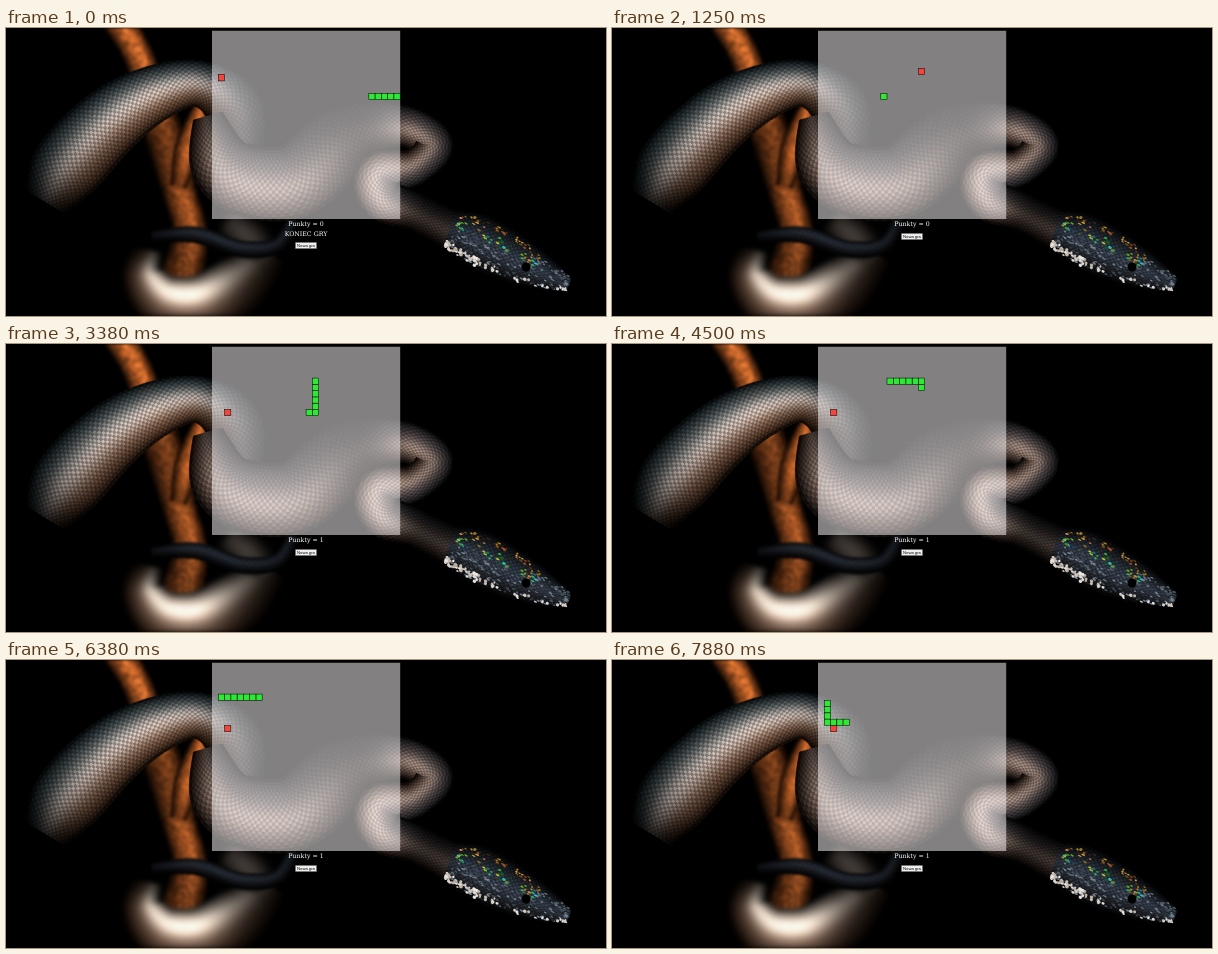
Recreate the animation shown at these times as an HTML page with a canvas. Size 600 by 288 pixels, loop 8000 ms.

```html
<!DOCTYPE html>
<html lang="pl">
<head>
<meta charset="utf-8">
<title>Snake</title>
<style>
  html, body { margin: 0; width: 100%; height: 100%; overflow: hidden; background: #000; }
  #stage { position: absolute; left: 0; top: 0; width: 600px; height: 288px; overflow: hidden; }
  canvas { position: absolute; left: 0; top: 0; }
  .line {
    position: absolute; left: 0; width: 600px; height: 10px; line-height: 10px;
    text-align: center; color: #fff; font-family: "DejaVu Serif", serif; font-size: 6.27px;
  }
  #score { top: 191px; }
  #over { top: 201px; }
  #button {
    position: absolute; left: 289px; width: 22px; height: 7px; line-height: 6px;
    box-sizing: border-box; border: 0.5px solid #767676; border-radius: 1px;
    background: #efefef; color: #000; text-align: center; white-space: nowrap;
    font-family: "Liberation Sans", Arial, sans-serif; font-size: 4.17px;
  }
</style>
</head>
<body>
<div id="stage">
  <canvas id="view" width="600" height="288"></canvas>
  <div class="line" id="score"></div>
  <div class="line" id="over">KONIEC GRY</div>
  <div id="button">Nowa gra</div>
</div>
<script>
const W = 600, H = 288, LOOP = 8000, FRAME = 125, TICK = 200;
const RESTART = 1125, FIRST_TICK = 1140;
const BOARD = { x: 206, y: 2.7, size: 188.2 };
const CELL = BOARD.size / 30;
const $ = id => document.getElementById(id);
const ctx = $('view').getContext('2d');

// ---------- background ----------
function makeLayer() {
  const c = document.createElement('canvas');
  c.width = W;
  c.height = H;
  return c;
}
const photo = makeLayer();
const p = photo.getContext('2d');

let seed = 7;
const rand = () => (seed = (seed * 16807) % 2147483647) / 2147483647;

function spline(pts, u) {
  const i = Math.min(Math.floor(u), pts.length - 2), t = u - i;
  const q = j => pts[Math.max(0, Math.min(pts.length - 1, j))];
  const [a, b, c, d] = [q(i - 1), q(i), q(i + 1), q(i + 2)];
  return b.map((v, k) => v + 0.5 * t * (c[k] - a[k] +
    t * (2 * a[k] - 5 * v + 4 * c[k] - d[k] + t * (3 * (v - c[k]) + d[k] - a[k]))));
}

// Cross-section of a tube at u; at(v) runs from its left side (0) to its right (1).
function slice(pts, u) {
  const end = pts.length - 1, [x, y, r, light] = spline(pts, u);
  const a = spline(pts, Math.max(0, u - 0.02)), b = spline(pts, Math.min(end, u + 0.02));
  const dx = b[0] - a[0], dy = b[1] - a[1], k = r / (Math.hypot(dx, dy) || 1);
  return { x, y, light, at: v => [x + dy * k * (1 - 2 * v), y - dx * k * (1 - 2 * v)] };
}

// pts: [x, y, radius, brightness]; left and right tints blend, shine is added around peak.
function tube(pts, { left, right, shine, peak = 0.5, blur = 0.4, scale = 0.2, lanes = 22, grain }) {
  const rows = [];
  for (let u = 0; u <= pts.length - 1; u += 0.01) {
    const s = slice(pts, u), last = rows[rows.length - 1];
    if (!last || Math.hypot(s.x - last.x, s.y - last.y) >= 2.5) rows.push(s);
  }
  const layer = makeLayer(), g = layer.getContext('2d');
  g.lineWidth = 0.6;
  for (let i = 0; i < rows.length - 1; i++) {
    for (let j = 0; j < lanes; j++) {
      const v = (j + 0.5) / lanes;
      const round = Math.sin(Math.PI * v) ** 0.7;
      const gloss = Math.exp(-(((v - peak) / 0.2) ** 2));
      const bump = grain ? rand() * 2 - 1 : (i + j) % 2 * 2 - 1;
      const k = rows[i].light * (1 + scale * bump);
      const color = left.map((c, n) =>
        Math.min(255, k * (round * (c + (right[n] - c) * v) + gloss * shine[n])) | 0);
      g.fillStyle = g.strokeStyle = `rgb(${color})`;
      g.beginPath();
      g.moveTo(...rows[i].at(j / lanes));
      g.lineTo(...rows[i].at((j + 1) / lanes));
      g.lineTo(...rows[i + 1].at((j + 1) / lanes));
      g.lineTo(...rows[i + 1].at(j / lanes));
      g.closePath();
      g.fill();
      g.stroke();
    }
  }
  p.filter = `blur(${blur}px)`;
  p.drawImage(layer, 0, 0);
  p.filter = 'none';
}

function dot(x, y, rx, ry, angle, color) {
  p.fillStyle = color;
  p.beginPath();
  p.ellipse(x, y, rx, ry, angle, 0, 7);
  p.fill();
}

function paintHead() {
  const axis = [[444, 201, 20, 0.8], [468, 211, 26, 1], [500, 227, 25, 1],
    [535, 244, 18, 1], [564, 257, 7, 1]];
  const span = axis.length - 1, tilt = 0.45;
  tube(axis, { left: [34, 40, 48], right: [40, 42, 46], shine: [12, 16, 22] });
  const put = (t, v, rx, ry, color) => dot(...slice(axis, t * span).at(v), rx, ry, tilt, color);
  // shimmering scales on top, grey ones below
  for (let i = 0; i < 330; i++) {
    const t = 0.06 + rand() * 0.9, v = 0.08 + rand() * 0.84;
    const shimmer = v < 0.45 && t < 0.7;
    const hue = shimmer ? (v < 0.25 ? 15 + 35 * rand() : 25 + 185 * rand()) : 210;
    put(t, v, 1 + rand() * 1.2, 0.5 + rand() * 0.6,
      `hsl(${hue} ${shimmer ? 60 : 12}% ${12 + 45 * rand()}%)`);
  }
  // pale neck and jaw marks
  for (let i = 0; i < 75; i++) {
    const t = rand();
    put(0.03 + t * t * 0.95, 0.8 + 0.15 * rand(), 1 + rand(), 0.8 + rand(),
      `hsl(30 15% ${65 + 28 * rand()}%)`);
  }
  dot(520, 239, 4.5, 4.5, 0, '#000');
}

function paintPhoto() {
  p.fillStyle = '#000';
  p.fillRect(0, 0, W, H);

  const wood = { left: [150, 72, 28], right: [165, 85, 36], shine: [60, 36, 18],
    peak: 0.4, blur: 1.5, scale: 0.3, grain: true };
  tube([[112, -8, 16, 1], [134, 32, 15, 1], [160, 112, 20, 0.6], [174, 165, 17, 0.85],
    [184, 208, 18, 0.75], [172, 260, 24, 0.5]], wood);
  tube([[196, 78, 8, 1], [182, 120, 13, 1], [172, 160, 8, 0.5]], wood);

  // lowest coil, out of focus
  tube([[142, 222, 15, 0.2], [136, 248, 21, 0.75], [158, 274, 28, 1], [195, 277, 30, 1],
    [235, 256, 30, 0.45], [268, 224, 18, 0.18]],
    { left: [190, 165, 145], right: [60, 35, 22], shine: [150, 150, 145], peak: 0.3,
      blur: 2, scale: 0.05 });
  tube([[222, 192, 16, 0.3], [242, 208, 18, 0.4], [262, 222, 14, 0.15]],
    { left: [120, 105, 95], right: [170, 150, 135], shine: [40, 40, 40], blur: 4, scale: 0.05 });

  // thin tail
  tube([[146, 209, 6, 0.4], [190, 207, 8, 0.9], [236, 221, 8, 0.9], [272, 217, 8, 0.7],
    [290, 190, 7, 0.6]],
    { left: [40, 46, 54], right: [14, 15, 18], shine: [12, 14, 18], peak: 0.35, blur: 0.8, lanes: 6 });

  // left loop
  tube([[40, 174, 24, 0.18], [62, 138, 36, 0.7], [105, 93, 34, 0.95], [150, 65, 28, 1],
    [194, 56, 23, 0.85], [228, 80, 29, 0.4], [235, 122, 26, 0.2]],
    { left: [66, 92, 102], right: [150, 98, 66], shine: [80, 78, 80], peak: 0.48 });

  // middle body, far bend, front bend and neck
  tube([[202, 88, 15, 0.4], [215, 133, 32, 0.85], [244, 153, 36, 1], [290, 152, 37, 0.85],
    [335, 114, 36, 0.3], [366, 100, 27, 0.3], [402, 99, 20, 0.9], [428, 117, 19, 0.8],
    [408, 139, 18, 0.9], [374, 147, 23, 1.1], [378, 171, 22, 1], [410, 184, 19, 0.38],
    [450, 204, 20, 0.4]],
    { left: [76, 74, 80], right: [120, 92, 78], shine: [60, 54, 48], peak: 0.58 });
  paintHead();
}

// ---------- game ----------
const corners = [[10, 10], [16, 10], [16, 5], [1, 5], [1, 9], [8, 9]];
const path = [corners[0]];
for (const [cx, cy] of corners.slice(1)) {
  let [x, y] = path[path.length - 1];
  while (x !== cx || y !== cy) {
    x += Math.sign(cx - x);
    y += Math.sign(cy - y);
    path.push([x, y]);
  }
}
const EATEN = 10;

function stateAt(t) {
  if (t < RESTART) {
    return { over: true, points: 0, food: [1, 7], body: [25, 26, 27, 28, 29].map(x => [x, 10]) };
  }
  const n = Math.max(0, Math.floor((t - FIRST_TICK) / TICK));
  const points = n >= EATEN ? 1 : 0;
  return {
    over: false,
    points,
    food: points ? [2, 10] : [16, 6],
    body: path.slice(Math.max(0, n - 5 - points), n + 1)
  };
}

function square([cx, cy], color) {
  const x = BOARD.x + cx * CELL, y = BOARD.y + cy * CELL;
  ctx.fillStyle = color;
  ctx.fillRect(x, y, CELL, CELL);
  ctx.strokeRect(x, y, CELL, CELL);
}

function draw(now) {
  const t = Math.floor((now % LOOP) / FRAME) * FRAME;
  const s = stateAt(t);
  ctx.drawImage(photo, 0, 0);
  ctx.save();
  ctx.beginPath();
  ctx.rect(BOARD.x, BOARD.y, BOARD.size, BOARD.size);
  ctx.clip();
  ctx.fillStyle = 'rgba(255,251,254,0.51)';
  ctx.fillRect(0, 0, W, H);
  ctx.strokeStyle = '#0a0a0a';
  ctx.lineWidth = 0.55;
  square(s.food, '#f4453c');
  s.body.forEach(c => square(c, '#2ee835'));
  ctx.restore();
  $('score').textContent = 'Punkty = ' + s.points;
  $('over').style.display = s.over ? 'block' : 'none';
  $('button').style.top = (s.over ? 214 : 204.6) + 'px';
}

paintPhoto();
const start = performance.now();
function loop() {
  draw(performance.now() - start);
  requestAnimationFrame(loop);
}
loop();
</script>
</body>
</html>
```
